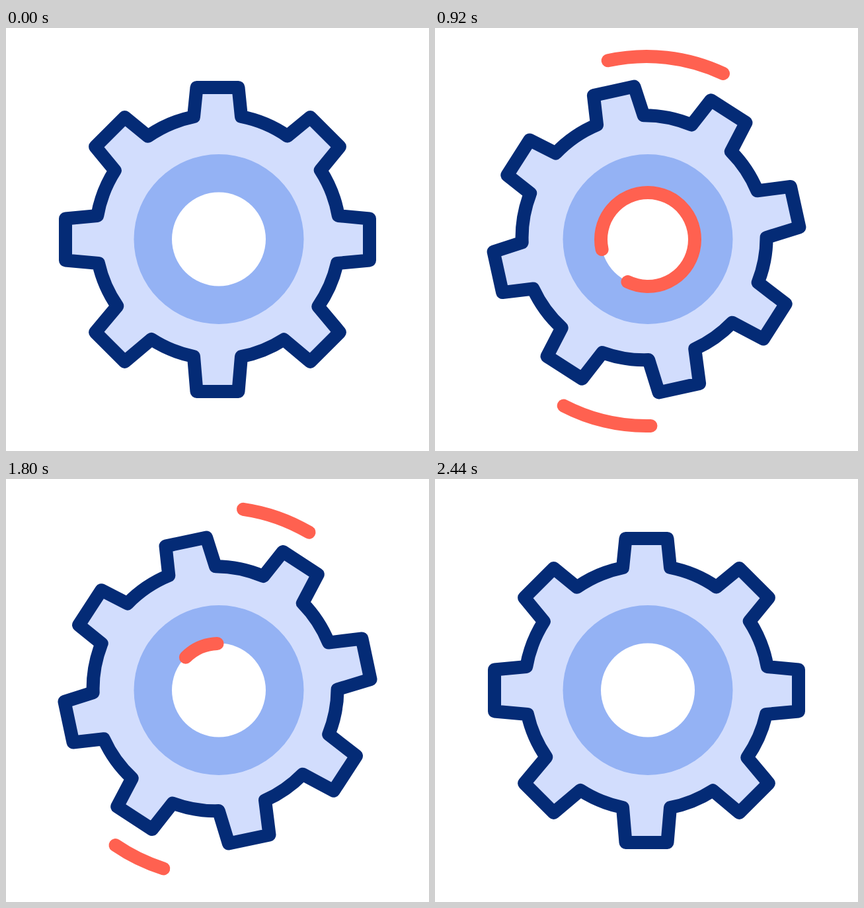
Animation, 640 px wide and 640 px high, one loop 2.48 s. Source, as an HTML page:

```html
<!DOCTYPE html>
<html lang="en">
<head>
<meta charset="utf-8">
<title>Turning gear</title>
<style>
  html, body { margin: 0; width: 100%; height: 100%; overflow: hidden; background: #fff; }
  svg { display: block; width: 100%; height: 100%; }
  .accent { fill: none; stroke: #ff6150; stroke-width: 20; stroke-linecap: round; }
</style>
</head>
<body>
<svg viewBox="0 0 640 640">
  <path id="gear" fill="#d2ddfd" stroke="#042b76" stroke-width="20" stroke-linejoin="round"/>
  <circle cx="322" cy="319.5" r="128.5" fill="#94b2f4"/>
  <circle cx="322" cy="319.5" r="71" fill="#fff"/>
  <path id="ring" class="accent"/>
  <path id="top" class="accent"/>
  <path id="bottom" class="accent"/>
</svg>
<script>
const LOOP = 2480, STEP = 40, RAD = Math.PI / 180;
const el = id => document.getElementById(id);

const span = (t, from, to) => Math.min(1, Math.max(0, (t - from) / (to - from)));
const smooth = u => u * u * (3 - 2 * u);
const ease = (t, from, to, power = 1) => smooth(span(t, from, to) ** power);

// The body circle sits a little above the pivot, so the teeth differ in depth
function gearPath() {
  const tip = 230, tipHalf = 31.5, rootHalf = 36, body = 185, cx = 0.5, cy = -4.4;
  let d = '';
  for (let k = 0; k < 8; k++) {
    const s = Math.sin(k * 45 * RAD), c = Math.cos(k * 45 * RAD);
    const at = (x, r) => `${x * c + r * s} ${x * s - r * c}`;
    const root = x => at(x, cx * s - cy * c + Math.sqrt(body ** 2 - (x - cx * c - cy * s) ** 2));
    d += k ? `A${body} ${body} 0 0 1 ` : 'M';
    d += `${root(-rootHalf)}L${at(-tipHalf, tip)}L${at(tipHalf, tip)}L${root(rootHalf)}`;
    if (k === 7) d += `A${body} ${body} 0 0 1 ${d.slice(1, d.indexOf('L'))}Z`;
  }
  return d;
}

// Degrees run clockwise from the top
function drawArc(id, cx, cy, rx, ry, from, to) {
  const at = deg => `${cx + rx * Math.sin(deg * RAD)} ${cy - ry * Math.cos(deg * RAD)}`;
  const large = to - from > 180 ? 1 : 0;
  el(id).setAttribute('d', to - from > 0.6 ? `M${at(from)}A${rx} ${ry} 0 ${large} 1 ${at(to)}` : '');
}

function draw(t) {
  const angle = 110 * (ease(t, 0, 1345, 1.75) - ease(t, 1350, 2272));
  el('gear').setAttribute('transform', `translate(320 320) rotate(${-angle})`);

  const base = 55 - angle - 226 * (1 - span(t, 334, 1384));
  const head = 360 * ease(t, 334, 1105);
  const tail = 360 * (1 - ease(t, 2480, 1147, 2.28));
  drawArc('ring', 322, 320, 71, 71, base + tail, base + head);

  const mid = 90 - 115 * ease(t, 541, 1118) + 115 * span(t, 1200, 2110) ** 2.3;
  const half = 24 * (ease(t, 454, 1129) - ease(t, 1420, 2140));
  const sweep = (id, centre, reach) =>
    drawArc(id, 320, 322.5, 276, 279.5, centre - reach, centre + reach);
  sweep('top', mid, half);
  sweep('bottom', mid + 186.5, half * 0.765);
}

el('gear').setAttribute('d', gearPath());
const start = performance.now();
function tick() {
  const t = (performance.now() - start) % LOOP;
  draw(Math.floor(t / STEP) * STEP);
  requestAnimationFrame(tick);
}
tick();
</script>
</body>
</html>
```
